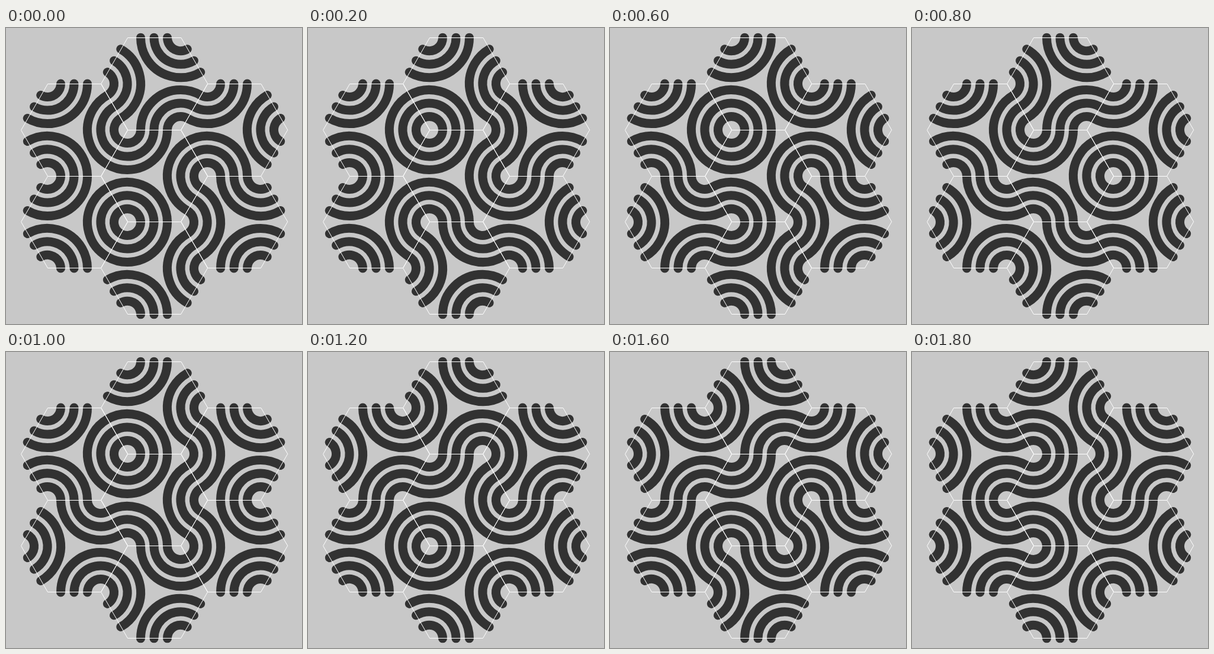
Animation of 500 by 500 pixels, one loop 2000 ms. Source, as an HTML page with a canvas:

```html
<!DOCTYPE html>
<html>
<head>
<meta charset="utf-8">
<style>
  html, body { margin: 0; width: 100%; height: 100%; overflow: hidden; background: #c8c8c8; }
  canvas { display: block; }
</style>
</head>
<body>
<canvas id="stage" width="500" height="500"></canvas>
<script>
const ctx = document.getElementById('stage').getContext('2d');
const SIDE = 90, STEP = 200, STATES = 10;
const SIXTH = Math.PI / 3;

const polar = ([x, y], r, a) => [x + r * Math.cos(a), y + r * Math.sin(a)];
const corner = (hex, k) => polar(hex, SIDE, k * SIXTH);
const snap = v => Math.floor(v + 1e-6) + 0.5;

// Ring of six tiles, clockwise from the top, around a fixed middle tile
const middle = [250, 250];
const ring = Array.from({ length: 6 }, (_, i) =>
  polar(middle, SIDE * Math.sqrt(3), (i - 1.5) * SIXTH));

// Three bundles of arcs, on the even corners (parity 0) or the odd ones (1)
function drawArcs(hex, parity) {
  for (let k = parity; k < 6; k += 2) {
    const [x, y] = corner(hex, k);
    for (let n = 1; n < 4; n++) {
      ctx.beginPath();
      ctx.arc(x, y, n * SIDE / 4, (k + 2) * SIXTH, (k + 4) * SIXTH);
      ctx.stroke();
    }
  }
}

function drawOutline(hex) {
  ctx.beginPath();
  for (let k = 0; k < 6; k++) ctx.lineTo(...corner(hex, k).map(snap));
  ctx.closePath();
  ctx.stroke();
}

function draw(step) {
  // Each bit of the pattern number sets one ring tile
  const pattern = 5 * (step + 1);
  ctx.fillStyle = '#c8c8c8';
  ctx.fillRect(0, 0, 500, 500);

  ctx.strokeStyle = '#323232';
  ctx.lineWidth = SIDE / 6;
  ctx.lineCap = 'round';
  drawArcs(middle, 0);
  ring.forEach((hex, i) => drawArcs(hex, pattern >> i & 1));

  ctx.strokeStyle = '#fff';
  ctx.lineWidth = 1;
  [middle, ...ring].forEach(drawOutline);
}

const start = performance.now();
function tick() {
  draw(Math.floor((performance.now() - start) / STEP) % STATES);
  requestAnimationFrame(tick);
}
tick();
</script>
</body>
</html>
```
